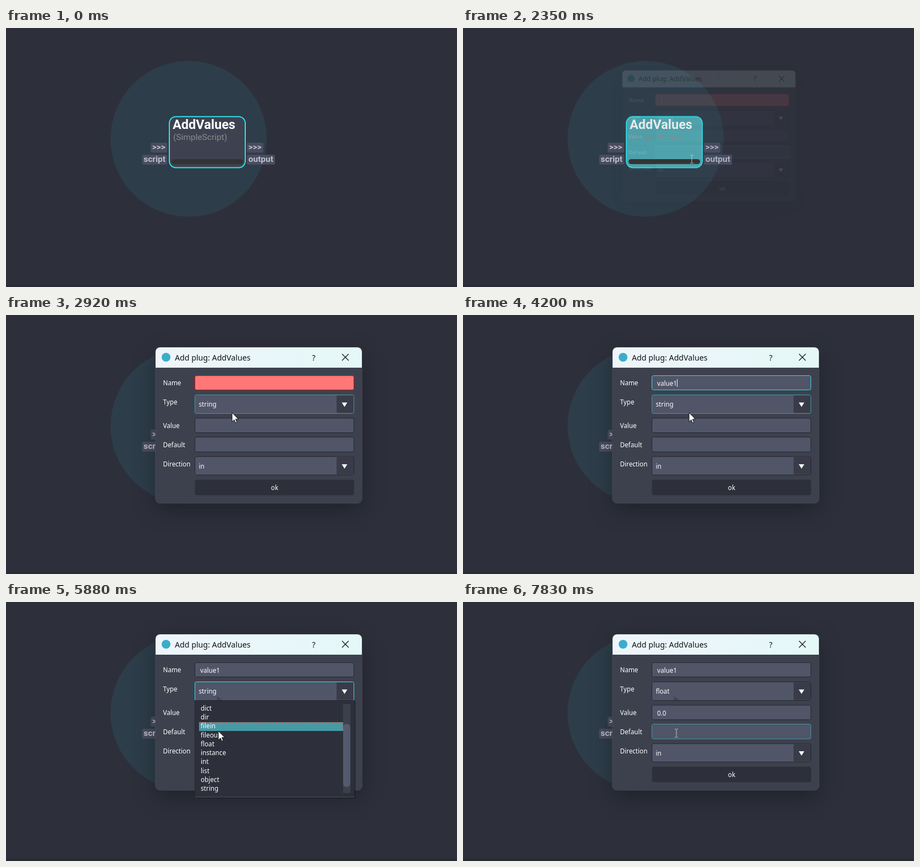
Animation of 820 by 472 pixels, one loop 8000 ms. Source, as an HTML page:

```html
<!DOCTYPE html>
<html lang="en">
<head>
<meta charset="utf-8">
<title>Add plug</title>
<style>
html, body { margin: 0; width: 100%; height: 100%; overflow: hidden; background: #2d303b; }
svg { display: block; width: 820px; height: 472px; }
text { white-space: pre; }
.ui { font: 11.7px "Noto Sans", "Open Sans", sans-serif; fill: #fff; }
.title { font: 14.2px "Noto Sans", "Open Sans", sans-serif; fill: #111; }
.plug { font: bold 15.5px Roboto, sans-serif; fill: #bcbfca; }
.field { fill: #505568; stroke: #24262e; }
#shadow { filter: drop-shadow(0 12px 20px rgba(0, 0, 0, .3)); }
</style>
</head>
<body>
<svg viewBox="0 0 820 472" xmlns="http://www.w3.org/2000/svg">
  <defs>
    <linearGradient id="bar"><stop stop-color="#eef5fb"/><stop offset="1" stop-color="#e4f8f7"/></linearGradient>
  </defs>
  <rect width="820" height="472" fill="#2d303b"/>
  <circle cx="332" cy="202" r="142" fill="#2d3d49"/>
  <rect y="467" width="820" height="5" fill="#2a2c35"/>

  <g id="plugs"></g>
  <rect id="node" x="297" y="161.5" width="138" height="93" rx="12" stroke="#2fe2ee" stroke-width="2"/>
  <rect x="301" y="239" width="130" height="9" rx="4.5" fill="#333"/>
  <text x="303" y="184" font-family="Roboto, sans-serif" font-size="23.5" font-weight="bold" fill="#fff">AddValues</text>
  <text id="kind" x="304" y="204" font-family="Roboto, sans-serif" font-size="15.5" fill="#8b8b8f">(SimpleScript)</text>

  <g id="dialog">
    <rect id="shadow" x="272" y="59" width="375" height="284" rx="8" fill="#3d414e"/>
    <path d="M272 96V67a8 8 0 0 1 8-8H639a8 8 0 0 1 8 8V96Z" fill="url(#bar)"/>
    <rect x="271.5" y="58.5" width="376" height="284.5" rx="8" fill="none" stroke="#4a4e5a" stroke-opacity=".7"/>
    <circle cx="291" cy="77" r="8" fill="#3badcb"/>
    <text class="title" x="307" y="83">Add plug: AddValues</text>
    <text class="title" x="556.5" y="82.5">?</text>
    <path d="M611 71l12 12m0-12l-12 12" stroke="#111" stroke-width="1.3"/>
    <g id="rows"></g>
    <rect x="343.5" y="300" width="289.5" height="28.5" rx="4" fill="#2d303a"/>
    <text class="ui" x="488.5" y="319" text-anchor="middle">ok</text>
    <path id="caret" stroke="#fff" d="M0 117v14"/>
    <path id="smudge" d="M383.5 171v8h9.5Z" fill="#454453"/>
  </g>

  <g id="popup">
    <rect x="345" y="181" width="291" height="177" fill="#1d1f26" opacity=".5"/>
    <rect x="343.5" y="179.5" width="290" height="176" fill="#2d303b" stroke="#24262e"/>
    <path d="M344 355.5H633" stroke="#4a4e5b"/>
    <rect x="613" y="186" width="13" height="162" fill="#3c404d"/>
    <rect x="613" y="222" width="13" height="115" rx="6" fill="#545a6e"/>
    <g id="pick">
      <rect x="351" width="262" height="16" fill="#469aa5"/>
      <path d="M351 .5H612.5V16" fill="none" stroke="#c8604f" stroke-dasharray="4 2"/>
    </g>
    <g id="items"></g>
  </g>

  <g id="cursor">
    <path id="arrow" d="M0 0V16.5L3.9 12.9 6.4 18.6 8.9 17.5 6.4 11.9H11.6Z" fill="#fff" stroke="#111"/>
    <path id="beam" d="M-3 -7.5H-1L0 -6.5 1 -7.5H3M0 -6.5V6.5M-3 7.5H-1L0 6.5 1 7.5H3" fill="none" stroke="#c6c6c6"/>
  </g>
  <circle id="click" r="15" fill="#f00" opacity=".5"/>
</svg>
<script>
const LOOP = 8000;
const $ = id => document.getElementById(id);
const show = (id, on) => $(id).setAttribute("visibility", on ? "visible" : "hidden");
const within = (t, a, b) => t >= a && t < b;

function add(parent, tag, attrs, text) {
  const el = document.createElementNS("http://www.w3.org/2000/svg", tag);
  for (const k in attrs) el.setAttribute(k, attrs[k]);
  if (text) el.textContent = text;
  return $(parent).appendChild(el);
}

// Node plugs: x, y, width, label
for (const [x, y, w, label] of [[263, 209, 30, ">>>"], [247.5, 231, 45.5, "script"],
                                [438, 209, 30, ">>>"], [438, 231, 51, "output"]]) {
  add("plugs", "rect", { x, y, width: w, height: 18, rx: 2.5, fill: "#4a4c60" });
  add("plugs", "text", { x: x + 2.7, y: y + 13, class: "plug" }, label);
}

// Dialog rows: label, label baseline, top, height, is a combo box
const rows = [["Name", 128, 110.5, 26], ["Type", 163, 145.5, 34, true], ["Value", 206, 188, 26.5],
              ["Default", 241, 222.5, 27], ["Direction", 276, 258, 33.5, true]
].map(([label, base, y, h, combo]) => {
  add("rows", "text", { x: 285.5, y: base, class: "ui" }, label);
  const box = add("rows", "rect", { x: 343.5, y, width: 289, height: h, rx: 3, class: "field" });
  if (combo) {
    add("rows", "rect", { x: 601, y: y + 1, width: 31, height: h - 2, rx: 2, fill: "#393c48" });
    add("rows", "path", { d: `M610.5 ${y + 14}h10l-5 8Z`, fill: "#fff" });
  }
  const text = add("rows", "text", { x: combo ? 350.5 : 353, y: combo ? y + 21.5 : y + 18.5, class: "ui" });
  return { y, h, combo, box, text };
});
const [nameRow, typeRow, valueRow, , directionRow] = rows;
directionRow.text.textContent = "in";

const ITEM = 16.25, LIST_TOP = 186;
"dict dir filein fileout float instance int list object string".split(" ").forEach((name, i) =>
  add("items", "text", { x: 354, y: LIST_TOP + i * ITEM + 11.8, class: "ui" }, name));

// Cursor moves: start, end, visible steps, path
const moves = [
  [400, 670, 5, [[830, 485], [743, 447], [630, 380], [510, 300], [390, 235], [310, 361]]],
  [860, 1200, 6, [[310, 361], [306, 330], [298, 270], [296, 216], [335, 198], [348, 193], [348, 193]]],
  [1400, 1530, 3, [[348, 193], [400, 215], [459, 237], [416, 239]]],
  [2790, 2920, 3, [[416, 239], [415, 222], [412, 190], [411, 178]]],
  [4870, 4930, 2, [[411, 178], [411, 168], [410, 159]]],
  [5340, 6020, 11, [[410, 159], [406, 159], [400, 158], [393, 156], [388, 157], [385, 159],
                    [383, 160], [384, 188], [385, 222], [386, 235], [385, 252], [384, 258]]],
  [6750, 7430, 11, [[384, 258], [385, 250], [388, 225], [388, 201]]],
  [7690, 7830, 3, [[388, 201], [388, 208], [388, 225], [388, 239]]]
];
const clicks = [[1130, 1200], [2130, 2270], [5070, 5200], [6560, 6750]];
const keys = [3390, 3720, 3790, 3920, 4060, 4200];

// Progress in n hard steps, the first at a and the last at b
function stepped(t, a, b, n) {
  if (t < a) return 0;
  return Math.min(1, (Math.floor((t - a) / ((b - a) / (n - 1)) + .15) + 1) / n);
}

function along(path, p) {
  const s = p * (path.length - 1) + 1e-6;
  const i = Math.min(path.length - 2, Math.floor(s));
  return path[i].map((v, k) => v + (path[i + 1][k] - v) * Math.min(1, s - i));
}

function cursorAt(t) {
  const [a, b, n, path] = moves.filter(m => t >= m[0]).pop() || moves[0];
  return along(path, stepped(t, a, b, n));
}

function drawDialog(t) {
  const u = Math.max(0, stepped(t, 2270, 2600, 6) * 6 - 1) / 5;
  const scale = .75 + .25 * (1 - (1 - u) ** 2);
  $("dialog").setAttribute("opacity", u * u * (3 - 2 * u) * (u < 1 ? 1.15 : 1));
  $("dialog").setAttribute("transform", `translate(381.5 172.5) scale(${scale}) translate(-381.5 -172.5)`);
  show("dialog", u > 0);
}

function drawFields(t, hovered) {
  const typed = keys.filter(k => t >= k).length;
  const open = t >= 5140 && t < 6820;
  for (const row of rows) row.box.style.stroke = row === hovered && !open ? "#43979f" : "#24262e";
  if (!typed) nameRow.box.style.stroke = "#f00";
  else if (t < 5070) nameRow.box.style.stroke = "#33dde8";
  if (within(t, 5070, 6820)) typeRow.box.style.stroke = "#33dde8";
  nameRow.box.style.fill = typed ? "#505568" : "#ff7777";
  nameRow.text.textContent = "value1".slice(0, typed);
  typeRow.text.textContent = t < 6820 ? "string" : "float";
  valueRow.text.textContent = t < 6820 ? "" : "0.0";

  const caretX = typed ? 353.5 + nameRow.text.getComputedTextLength() : 357.5;
  $("caret").setAttribute("transform", `translate(${caretX} 0)`);
  show("caret", within(t, 2330, 2850) || within(t, 3390, 4870));
  show("smudge", t >= 5800);
  show("popup", open);
}

function draw(t) {
  const [x, y] = cursorAt(t);
  const dialogOpen = t >= 2270;
  const overNode = t >= 400 && (dialogOpen || (x >= 297 && x <= 435 && y >= 162 && y <= 254));
  $("node").setAttribute("fill", overNode ? "#50aeb6" : "#3e4250");
  $("kind").setAttribute("fill", overNode ? "#829599" : "#8b8b8f");

  const hovered = dialogOpen && rows.find(r => y >= r.y && y <= r.y + r.h);
  drawDialog(t);
  drawFields(t, hovered);

  const index = Math.floor((y - 3 - LIST_TOP) / ITEM);
  $("pick").setAttribute("transform", `translate(0 ${Math.round(LIST_TOP + (index < 0 ? 9 : index) * ITEM)})`);

  const listOpen = t >= 5140 && t < 6820;
  const beam = !!hovered && !hovered.combo && !listOpen;
  $("cursor").setAttribute("transform", `translate(${x} ${y})`);
  show("arrow", t >= 400 && !beam);
  show("beam", t >= 400 && beam);

  $("click").setAttribute("cx", x);
  $("click").setAttribute("cy", y - .5);
  show("click", clicks.some(([a, b]) => within(t, a, b)));
}

const start = performance.now();
function tick() {
  draw((performance.now() - start) % LOOP);
  requestAnimationFrame(tick);
}
tick();
</script>
</body>
</html>
```
